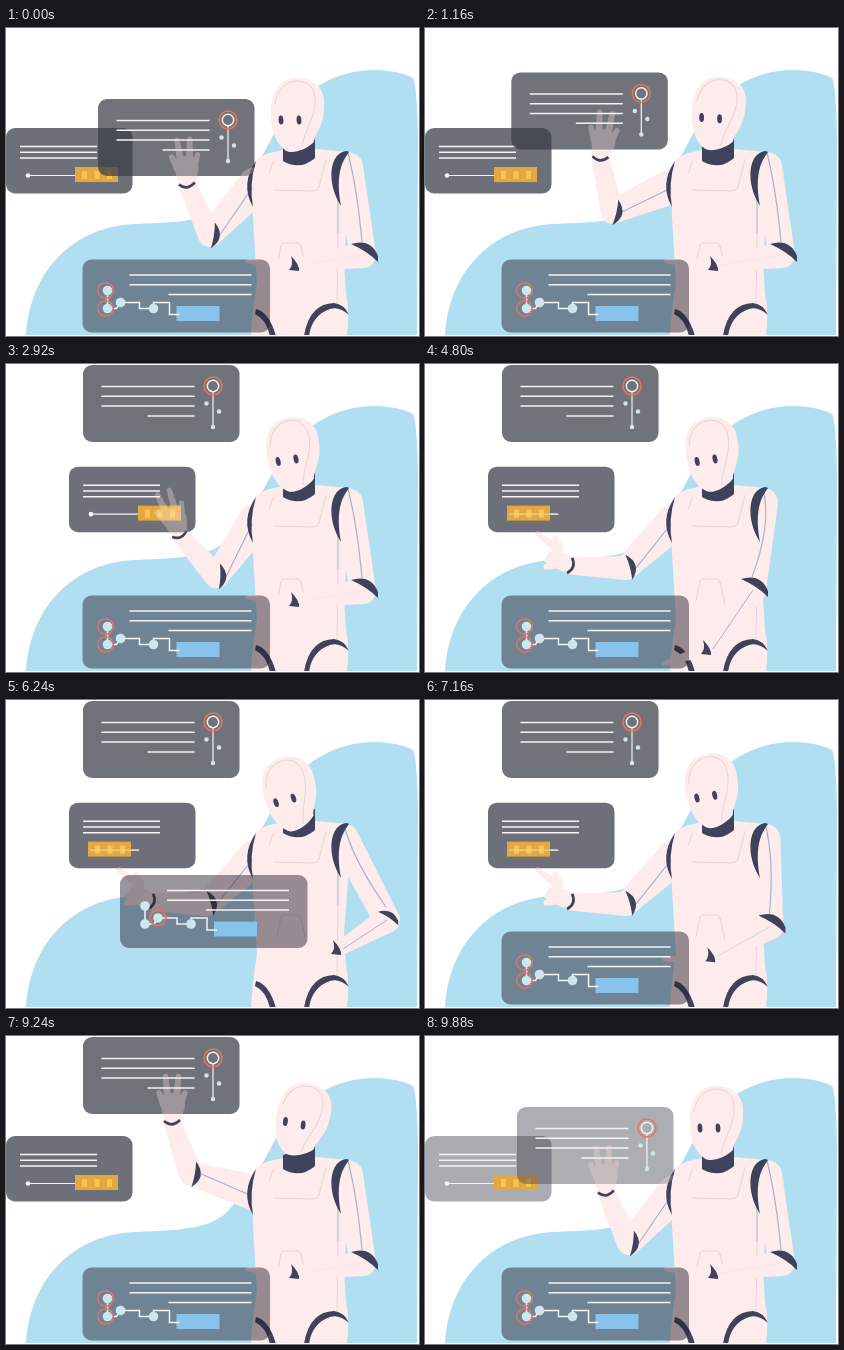
These frames come from a looping animation (413x308 px, 9.92 s). An HTML page with a canvas:

```html
<!DOCTYPE html>
<html lang="en">
<head>
<meta charset="utf-8">
<title>Robot assistant</title>
<style>
html, body { margin: 0; width: 100%; height: 100%; overflow: hidden; background: #fff; }
canvas { display: block; }
</style>
</head>
<body>
<canvas id="stage" width="413" height="307"></canvas>
<script>
const LOOP = 9920, DEG = Math.PI / 180;
const SKIN = '#fdeceb', SEAM = '#ecd2d3', DARK = '#3e425a', SKY = '#afdff1';
const CORAL = '#e8735f', LILAC = '#a9b0cf', PALE = '#cfe6ee', WHITE = '#f4f4f5';
const g = document.getElementById('stage').getContext('2d');
let now = 0;

// Timing: eased 0..1 between two times, and a rise that later falls back
function ease(from, to) {
  const k = Math.max(0, Math.min(1, (now - from) / (to - from)));
  return k * k * (3 - 2 * k);
}
const pulse = (up, top, down, end) => ease(up, top) - ease(down, end);
const mix = (a, b, k) => a.map((v, i) => v + (b[i] - v) * k);

// Drawing helpers
function fill(shape, color) {
  g.fillStyle = color;
  g.fill(shape instanceof Path2D ? shape : new Path2D(shape));
}
function stroke(d, color, width = 1) {
  g.strokeStyle = color;
  g.lineWidth = width;
  g.stroke(new Path2D(d));
}
function circle(x, y, r) {
  const path = new Path2D();
  path.arc(x, y, r, 0, 2 * Math.PI);
  return path;
}
function ring(x, y, r, color) {
  g.strokeStyle = color;
  g.lineWidth = 1.5;
  g.stroke(circle(x, y, r));
}
function box(x, y, w, h, color) {
  g.fillStyle = color;
  g.fillRect(x, y, w, h);
}
function at(x, y, deg, draw) {
  g.save();
  g.translate(x, y);
  g.rotate(deg * DEG);
  draw();
  g.restore();
}

// Text lines of a panel; the last one may start further right
function rows(count, left, right, top, step, lastLeft = left) {
  for (let i = 0; i < count; i++) {
    stroke(`M${i < count - 1 ? left : lastLeft} ${top + i * step}H${right}`, WHITE, 1.5);
  }
}

// Limb segment: hull of two circles
function taper(path, x1, y1, r1, x2, y2, r2) {
  const a = Math.atan2(y2 - y1, x2 - x1);
  const b = Math.acos(Math.max(-1, Math.min(1, (r1 - r2) / Math.hypot(x2 - x1, y2 - y1))));
  path.moveTo(x1 + r1 * Math.cos(a + b), y1 + r1 * Math.sin(a + b));
  path.arc(x1, y1, r1, a + b, a - b + 2 * Math.PI);
  path.arc(x2, y2, r2, a - b, a + b);
  path.closePath();
}

function drawBackdrop() {
  box(0, 0, 413, 307, '#fff');
  fill('M20 308C24 240 70 198 130 196C180 194 205 192 222 175C262 130 262 108 283 84C300 62 330 42 368 42' +
    'C385 42 400 46 407 50Q411 56 412 110L411 308Z', SKY);
}

function drawTorso() {
  fill('M277 122C262 125 248 128 246 140L247 190L251 255Q247 275 245 308H341Q344 283 340 266L338 235L342 180L343 124L309 121Z', SKIN);
  stroke('M267 133L260 158Q260 162 265 162L307 163Q312 163 313 159L320 131', SEAM);
  stroke('M271 237L275 217Q276 215 279 215H291Q294 215 295 218L300 241', SEAM);
  stroke('M332 165V205', LILAC);
  stroke('M332 205L331 275', SEAM);
  fill('M250 281Q263 284 270 308H264Q260 291 249 286Z', DARK);
  fill('M298 308Q303 276 328 275Q338 276 343 287Q333 278 324 281Q306 287 303 308Z', DARK);
}

function drawHead() {
  const tilt = 11 * (pulse(960, 1440, 2280, 2600) + pulse(8480, 8960, 9400, 9800))
    - 8 * pulse(2280, 2920, 8200, 8700) - 7 * pulse(4800, 5160, 6400, 7360);
  fill('M277 119L309 109V130Q294 143 277 133Z', DARK);
  at(293 - tilt * .2, 125 - tilt * .33, tilt, () => {
    g.translate(-293, -125);
    fill('M265 88C264 65 272 50 292 50C310 50 320 62 318 80C318 98 309 105 308 114C300 122 285 127 279 122C270 115 266 105 265 88Z', SKIN);
    stroke('M269 76C272 58 283 53 292 53C304 53 309 62 309 73C309 92 298 102 296 119', SEAM);
    for (const x of [275, 293]) {
      const eye = new Path2D();
      eye.ellipse(x, 92, 2.4, 4.5, -.08, 0, 7);
      fill(eye, DARK);
    }
  });
}

// Far arm: elbow, wrist, fingertips
const FOLDED = [357, 227, 291, 237, 241, 233];
const GRAB = [328, 226, 284, 285, 238, 300];
const HIP = [381, 220, 333, 249, 304, 243];

function drawFarArm() {
  const grab = pulse(4480, 4800, 6900, 7360), hip = pulse(4880, 5160, 6400, 6900);
  const [ex, ey, wx, wy, tx, ty] = mix(mix(FOLDED, GRAB, grab), HIP, hip);
  const sx = 342 - 4 * grab, arm = new Path2D();
  taper(arm, sx, 139, 15, ex, ey, 13);
  taper(arm, ex, ey, 13, wx, wy, 7);
  taper(arm, wx, wy, 7, tx, ty, 2);
  fill(arm, SKIN);
  stroke(`M${sx} 125Q${sx + 9} 160 ${ex - 1} ${ey - 13}`, LILAC, 1.2);
  stroke(`M${ex} ${ey}L${wx + 4} ${wy}`, LILAC, grab * .9 + .1);
  fill('M341 123C323 124 320 155 335 178C331 155 332 138 343 124Z', DARK);
  at(ex, ey, 0, () => {
    g.scale(1 - .25 * hip, 1 - .25 * hip);
    fill('M-12 -11Q8 -17 15 1V7Q4 -4 -12 -11Z', DARK);
  });
  at(wx, wy, 0, () => fill('M-6 -9Q3 0 2 6L-8 5Q-3 0 -6 -9Z', DARK));
}

// Stops of the near wrist; the elbow follows from the bone lengths
const REST = [181, 157], RAISED = [166, 86], REACH = [130, 174], HOLD = [174, 171], POINT = [146, 202];
const wristMoves = [
  [960, 1440, RAISED], [2280, 2600, REACH], [2600, 2920, HOLD], [3240, 3720, REACH], [3720, 4120, POINT],
  [7440, 7740, REACH], [7740, 8140, HOLD], [8220, 8500, REACH], [8500, 8960, RAISED], [9400, 9800, REST]
];
const UPPER = 68, FORE = 55, SHOULDER = [250, 157];

function nearArm() {
  const [sx, sy] = SHOULDER;
  const [wx, wy] = wristMoves.reduce((p, [from, to, stop]) => mix(p, stop, ease(from, to)), REST);
  const reach = Math.min(UPPER + FORE - .1, Math.hypot(wx - sx, wy - sy));
  const bend = Math.acos((UPPER ** 2 + reach ** 2 - FORE ** 2) / (2 * UPPER * reach));
  const dir = Math.atan2(wy - sy, wx - sx) - bend;
  const ex = sx + UPPER * Math.cos(dir), ey = sy + UPPER * Math.sin(dir);
  const fore = Math.atan2(wx - ex, ey - wy) / DEG;
  return { ex, ey, wx, wy, turn: fore + 20, band: 18 + fore * .38, point: pulse(3720, 4120, 7440, 7740) };
}

function handShape(point) {
  const hand = new Path2D();
  taper(hand, 0, -2, 8, 1, -17, 12 - 3 * point);
  for (let i = 0; i < 4; i++) {
    const open = i % 3 ? 46 : 32, length = open + (25 - open) * point * (i < 2);
    const angle = ((i - 1.5) * 16 + 14 * point * (i > 1)) * DEG;
    const x = length * Math.sin(angle), y = -length * Math.cos(angle);
    taper(hand, x * .6, -17, 4, x, y, 2.7);
  }
  return hand;
}

function drawNearArm({ ex, ey, wx, wy, turn, band, point }) {
  const [sx, sy] = SHOULDER, arm = new Path2D();
  taper(arm, sx, sy, 18, ex, ey, 12);
  taper(arm, ex, ey, 12, wx, wy, 8.5);
  arm.addPath(handShape(point), new DOMMatrix().translate(wx, wy).rotate(turn));
  fill(arm, SKIN);
  stroke(`M${ex + 10} ${ey}L246 ${sy + 3}`, LILAC, 1.2);
  at(ex, ey, band, () => fill('M3 -13Q17 0 3 13Q5 0 3 -13Z', DARK));
  at(wx, wy, turn, () => stroke('M-8 -1Q0 6 8 -2', DARK, 2.6));
  fill('M250 133Q234 156 247 179Q243 156 250 133Z', DARK);
}

// Draws a glass panel and returns its outline
function panel(x, y, w, h, color, alpha, draw) {
  const glass = new Path2D();
  glass.roundRect(x, y, w, h, 9);
  g.globalAlpha = alpha;
  fill(glass, color);
  g.globalAlpha = 1;
  at(x, y, 0, draw);
  return glass;
}

function drawMiddlePanel(fade) {
  const x = 63 * pulse(2600, 2880, 8250, 8500), y = 100 + x / 24;
  return panel(x, y, 126.5, 65.5, '#3a3e4a', .74 * fade, () => {
    const slide = 69 - 50 * pulse(3320, 3800, 7660, 8100);
    rows(3, 14, 91, 18.5, 5.8);
    stroke('M22 47.5H70', WHITE, 1.2);
    fill(circle(22, 47.5, 2.3), WHITE);
    box(slide, 39, 43, 15, '#e3a840');
    for (let i = 0; i < 3; i++) box(slide + 7 + 12.5 * i, 43, 5, 8, '#fbc54b');
    if (slide < 68) stroke(`M${slide + 2} 47.5H70`, '#f6d999');
  });
}

function drawTopPanel(fade) {
  const [x, y] = mix([92, 71], [77, 1], pulse(960, 1440, 9400, 9800));
  return panel(x, y, 156.5, 77, '#3a3e46', .72 * fade, () => {
    rows(4, 18.5, 111.5, 21.5, 9.8, 64.5);
    stroke('M130 27V62', WHITE, 1.2);
    ring(130, 21, 5.7, WHITE);
    for (const [dx, dy] of [[130, 62], [123.5, 38.5], [136, 46.5]]) fill(circle(dx, dy, 2.2), PALE);
    ring(130, 21 + 40 * pulse(1440, 1840, 2280, 2560), 9, CORAL);
  });
}

function drawLowPanel() {
  const [x, y] = mix([76.5, 231.5], [114, 175], pulse(4880, 5160, 6640, 6920));
  panel(x, y, 187.5, 73, '#241e2c', .47, () => {
    const link = pulse(5320, 6200, 6400, 6640);
    rows(3, 47, 169, 15.5, 9.7, 86);
    box(94, 46.5, 43, 15, '#88c3ec');
    stroke('M25 31V49H34L38 43H57V49H71V43H87V55H97', WHITE, 1.5);
    for (const [dx, dy] of [[25, 31], [25, 49], [38, 43], [71, 49]]) fill(circle(dx, dy, 4.8), PALE);
    for (const dy of [31, 49]) ring(23 + 15 * link, dy + (43 - dy) * link, 7.8, CORAL);
  });
}

function frame(time) {
  now = time % LOOP;
  const arm = nearArm(), fade = 1 - .42 * ease(9720, 9880);
  drawBackdrop();
  drawTorso();
  drawFarArm();
  drawHead();
  drawNearArm(arm);

  // The hand shows faintly through the upper panels
  const glass = drawMiddlePanel(fade);
  glass.addPath(drawTopPanel(fade));
  g.save();
  g.clip(glass);
  g.globalAlpha = .32;
  drawNearArm(arm);
  g.restore();

  drawLowPanel();
  requestAnimationFrame(frame);
}
requestAnimationFrame(frame);
</script>
</body>
</html>
```
